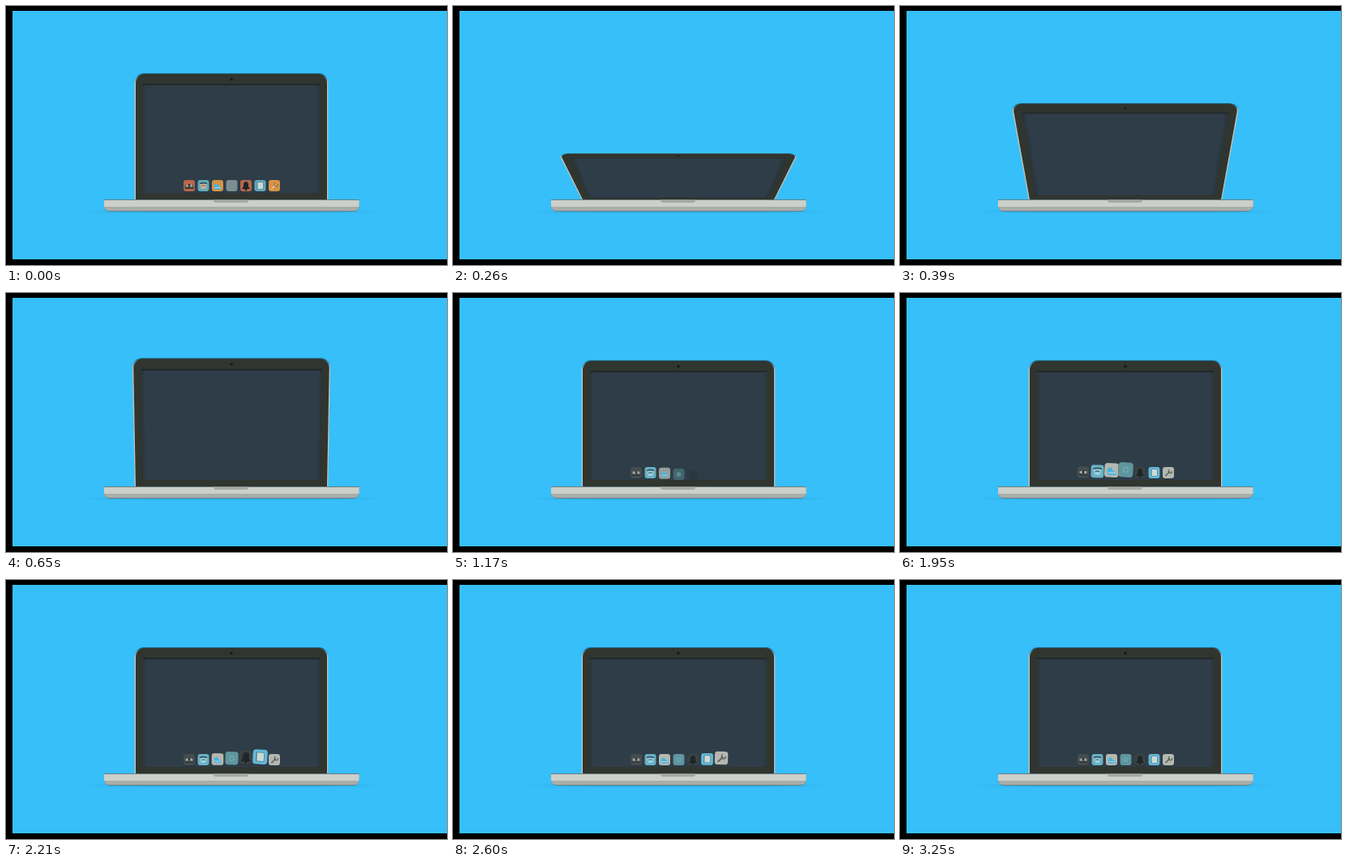
These frames come from a looping animation (544x320 px, 3510 ms). An HTML page with a canvas:

```html
<!DOCTYPE html>
<html lang="en">
<head>
<meta charset="utf-8">
<title>Laptop</title>
<style>
html, body { margin: 0; width: 100%; height: 100%; overflow: hidden; background: #000; }
canvas { display: block; width: 544px; height: 320px; }
</style>
</head>
<body>
<canvas id="stage" width="544" height="320"></canvas>
<script>
const ctx = document.getElementById('stage').getContext('2d');
const LOOP = 3510, STEP = 130;
const CENTER = 278, HINGE = 239, VIEW = 770;

const clamp = v => Math.min(1, Math.max(0, v));
const smooth = v => { v = clamp(v); return v * v * (3 - 2 * v); };

function rect(color, x, y, w, h, radius = 0) {
  ctx.fillStyle = color;
  ctx.beginPath();
  ctx.roundRect(x, y, w, h, radius);
  ctx.fill();
}

function disc(color, x, y, r) {
  ctx.fillStyle = color;
  ctx.beginPath();
  ctx.arc(x, y, r, 0, 2 * Math.PI);
  ctx.fill();
}

function shape(color, path) {
  ctx.fillStyle = color;
  ctx.fill(new Path2D(path));
}

function line(color, width, path) {
  ctx.strokeStyle = color;
  ctx.lineWidth = width;
  ctx.stroke(new Path2D(path));
}

// Places a point of the lid, height h above the hinge, on the stage.
function project(x, h, angle) {
  const s = VIEW / (VIEW - h * Math.cos(angle));
  return [CENTER + x * s, HINGE - h * Math.sin(angle) * s];
}

// A lid panel with rounded top corners, tilted by the lid angle.
function panel(color, angle, half, bottom, top, r = 0) {
  const points = [[-half, bottom]];
  for (const side of [-1, 1]) {
    for (let k = 0; k <= 8; k++) {
      const a = (side < 0 ? k : 8 - k) * Math.PI / 16;
      points.push([side * (half - r + r * Math.cos(a)), top - r + r * Math.sin(a)]);
    }
  }
  points.push([half, bottom]);
  ctx.fillStyle = color;
  ctx.beginPath();
  points.forEach(([x, h]) => ctx.lineTo(...project(x, h, angle)));
  ctx.fill();
}

function drawLid(angle) {
  panel('#1f6f91', angle, 118.8, 0, 156, 11);
  panel('#c3c4b8', angle, 119.3, 0, 154, 11);
  panel('#30352f', angle, 118, 0, 155, 11);
  panel('#20282a', angle, 109, 8, 143);
  panel('#2b3840', angle, 109, 8, 141);
  panel('#2e3d48', angle, 106, 8, 141);
  const [x, y] = project(0, 148.5, angle);
  ctx.save();
  ctx.translate(x, y);
  ctx.scale(1, Math.max(.1, Math.sin(angle)));
  disc('#151a1b', 0, 0, 1.7);
  ctx.restore();
}

function drawBase() {
  const glow = ctx.createLinearGradient(90, 0, 466, 0);
  glow.addColorStop(0, '#2ba6dc00');
  glow.addColorStop(.2, '#2ba6dc90');
  glow.addColorStop(.8, '#2ba6dc90');
  glow.addColorStop(1, '#2ba6dc00');
  rect(glow, 90, 252, 376, 4);
  rect('#697f84', 121, 239, 314.5, 15, [0, 0, 7, 7]);
  rect('#a9aeaa', 121, 240, 314.5, 13, [0, 0, 6, 6]);
  rect('#cccfca', 121, 240, 314.5, 8);
  rect('#a5a9a5', 256, 239.5, 43, 3.5, [0, 0, 3, 3]);
}

// Icon glyphs on a 14 x 14 tile centred at the origin.
const glyphs = [
  warm => {
    rect('#353b3c', -5.5, -1, 11, 5, 1);
    rect(warm ? '#d5b9a7' : '#c3c8c5', -5, -1.5, 10, 3);
    rect('#30383a', -1.5, -2, 3, 3.5);
    line('#30383a', 1, 'M-4 -2V1.5M4 -2V1.5');
  },
  warm => {
    shape(warm ? '#c6b39f' : '#9ed0da', 'M-4.5 -2H4.5L2.5 4H-2.5Z');
    line('#354b53', 1.4, 'M-4.5 -2.5Q0 -4.5 4.5 -2.5');
    line(warm ? '#a45b43' : '#3d6975', 1.2, 'M-2.5 .5Q0 -1 2.5 .5');
  },
  () => {
    disc('#43b6e1', -1.5, 0, 2.5);
    shape('#43b6e1', 'M-4 0L1 0L4.5 2V4.5H-4Z');
    line('#d4d8d1', .9, 'M-3.5 2.5H4');
  },
  warm => { if (!warm) { disc('#6fa5aa', 0, 0, 3); disc('#61949b', 0, 0, 1.5); } },
  () => {
    shape('#1f2628', 'M-5 4L-3 1V-2Q-2.5 -5 0 -5T3 -2V1L5 4Z');
    disc('#1f2628', 0, 4.5, 1.5);
  },
  () => {
    rect('#438094', -4, -4.5, 8, 9, 1);
    rect('#cbd9d4', -3, -4, 6.5, 8, .7);
  },
  warm => {
    line(warm ? '#e4c9a1' : '#59605d', 1.6, 'M-3.5 4L2 -1.5');
    line(warm ? '#8a6c47' : '#59605d', 1.2, 'M1 -4Q-1 0 2 .5T4.5 -2');
  }
];
const warmTiles = ['#b9664d', '#65a8b8', '#d79345', '#7c8e92', '#b9664d', '#65a8b8', '#d79345'];
const coolTiles = ['#454d4e', '#68b1c5', '#b4b7af', '#5f959f', '#394143', '#65b8d7', '#b4b7af'];

// Magnification of an icon as the wave passes: quick rise, slow fall.
function swell(t, i) {
  const u = t - (1550 + 135 * i);
  return u < 0 ? smooth(1 + u / 150) : smooth(1 - u / 520);
}

function drawIcon(i, t) {
  const warm = t < STEP;
  const shown = warm ? 1 : smooth((t - 960 - 40 * i) / 180);
  if (!shown) return;
  const s = swell(t, i);
  ctx.save();
  ctx.globalAlpha = shown;
  ctx.translate(226 + 17.5 * i, 222 - 3.5 * s + 4 * (1 - shown));
  ctx.rotate(.06 * s);
  ctx.scale(1 + .3 * s, 1 + .3 * s);
  rect('#1f2a30', -7, -6.5, 14, 14, 3);
  rect((warm ? warmTiles : coolTiles)[i], -7, -7, 14, 14, 3);
  glyphs[i](warm);
  ctx.restore();
}

function draw(t) {
  rect('#000', 0, 0, 544, 320);
  rect('#37bff9', 8, 6, 536, 307);
  const open = t < STEP ? 1 : (1 - Math.cos(Math.PI * clamp((t - 50) / 730))) / 2;
  drawLid(open * Math.PI / 2);
  drawBase();
  for (let i = 0; i < glyphs.length; i++) drawIcon(i, t);
}

const start = performance.now();
function tick() {
  const t = (performance.now() - start) % LOOP;
  draw(Math.floor(t / STEP) * STEP);
  requestAnimationFrame(tick);
}
tick();
</script>
</body>
</html>
```
